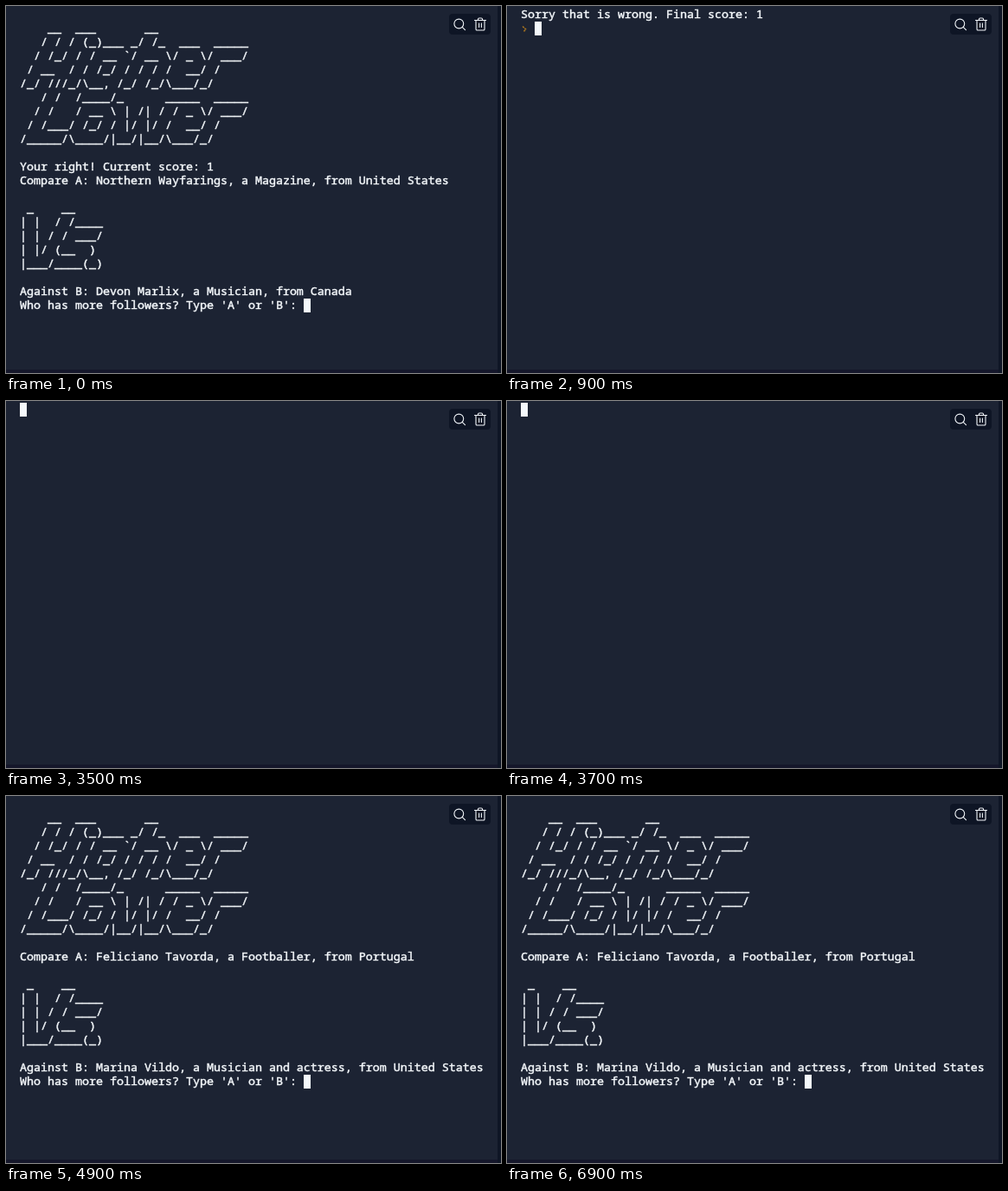
Animation, 572 px wide and 424 px high, one loop 8000 ms. Source, as an HTML page:

```html
<!DOCTYPE html>
<html lang="en">
<head>
<meta charset="utf-8">
<title>Higher Lower</title>
<style>
html, body { margin: 0; width: 100%; height: 100%; overflow: hidden; background: #1c2333; }
#stage { position: absolute; left: 0; top: 0; width: 572px; height: 424px; overflow: hidden; }
#screen {
  position: absolute; left: 16px; top: 1px; margin: 0; color: #f5f9fc;
  font: 13.3333px/16px "Noto Sans Mono", "DejaVu Sans Mono", monospace;
  font-variant-ligatures: none; white-space: pre; -webkit-text-stroke: .45px #f5f9fc;
}
#cursor { position: absolute; width: 8px; height: 16px; background: #f5f9fc; }
svg { position: absolute; left: 0; top: 0; }
</style>
</head>
<body>
<div id="stage">
  <pre id="screen"></pre>
  <div id="cursor"></div>
  <svg width="572" height="424" fill="none" stroke-linecap="round" stroke-linejoin="round">
    <path id="prompt" d="M18.5 24l3.5 3-3.5 3" stroke="#a87420" stroke-width="1.6" stroke-dasharray="1 2.2"/>
    <path d="M568 0h4v424h-4z" fill="#0e1525"/>
    <path d="M0 420h568v4H0z" fill="#15172b"/>
    <rect x="512" y="9" width="48" height="24" rx="4" fill="#0e1525"/>
    <g stroke="#f0f4f8" stroke-width="1.1">
      <circle cx="523.3" cy="20.5" r="5.4"/>
      <path d="M527.2 24.4l3.3 3.2"/>
      <path d="M541.5 16.5h13M545.5 16.5v-1.2q0-1.3 1.3-1.3h2.4q1.3 0 1.3 1.3v1.2M543 16.5v10.2q0 1.3 1.3 1.3h7.4q1.3 0 1.3-1.3v-10.2M546.6 20v4.5M549.4 20v4.5"/>
    </g>
  </svg>
</div>
<script>
const LOGO = String.raw`
    __  ___       __
   / / / (_)___ _/ /_  ___  _____
  / /_/ / / __ ~/ __ \/ _ \/ ___/
 / __  / / /_/ / / / /  __/ /
/_/ ///_/\__, /_/ /_/\___/_/
   / /  /____/_      _____  _____
  / /   / __ \ | /| / / _ \/ ___/
 / /___/ /_/ / |/ |/ /  __/ /
/_____/\____/|__/|__/\___/_/
`.replace("~", "`");

const VS = String.raw`
 _    __
| |  / /____
| | / / ___/
| |/ (__  )
|___/____(_)
`;

const round = (a, b, note = "") => `${LOGO}
${note}Compare A: ${a}
${VS}
Against B: ${b}
Who has more followers? Type 'A' or 'B': `;

const first = round("Northern Wayfarings, a Magazine, from United States",
  "Devon Marlix, a Musician, from Canada", "Your right! Current score: 1\n");
const second = round("Feliciano Tavorda, a Footballer, from Portugal",
  "Marina Vildo, a Musician and actress, from United States");
const lost = "Sorry that is wrong. Final score: 1\n  ";

// start time in ms, terminal contents
const steps = [[0, first], [500, first + "b"], [900, lost], [3500, ""], [4700, second]];
const LOOP = 8000;
const $ = id => document.getElementById(id);
let shown;

function draw(now) {
  const t = now % LOOP;
  const text = steps.filter(([start]) => start <= t).pop()[1];
  if (text !== shown) {
    shown = text;
    const lines = text.split("\n");
    $("screen").textContent = text;
    $("prompt").style.display = text === lost ? "" : "none";
    $("cursor").style.left = 16 + 8 * lines.at(-1).length + "px";
    $("cursor").style.top = 2 + 16 * (lines.length - 1) + "px";
  }
}

const begin = performance.now();
function tick() {
  draw(performance.now() - begin);
  requestAnimationFrame(tick);
}
tick();
</script>
</body>
</html>
```
